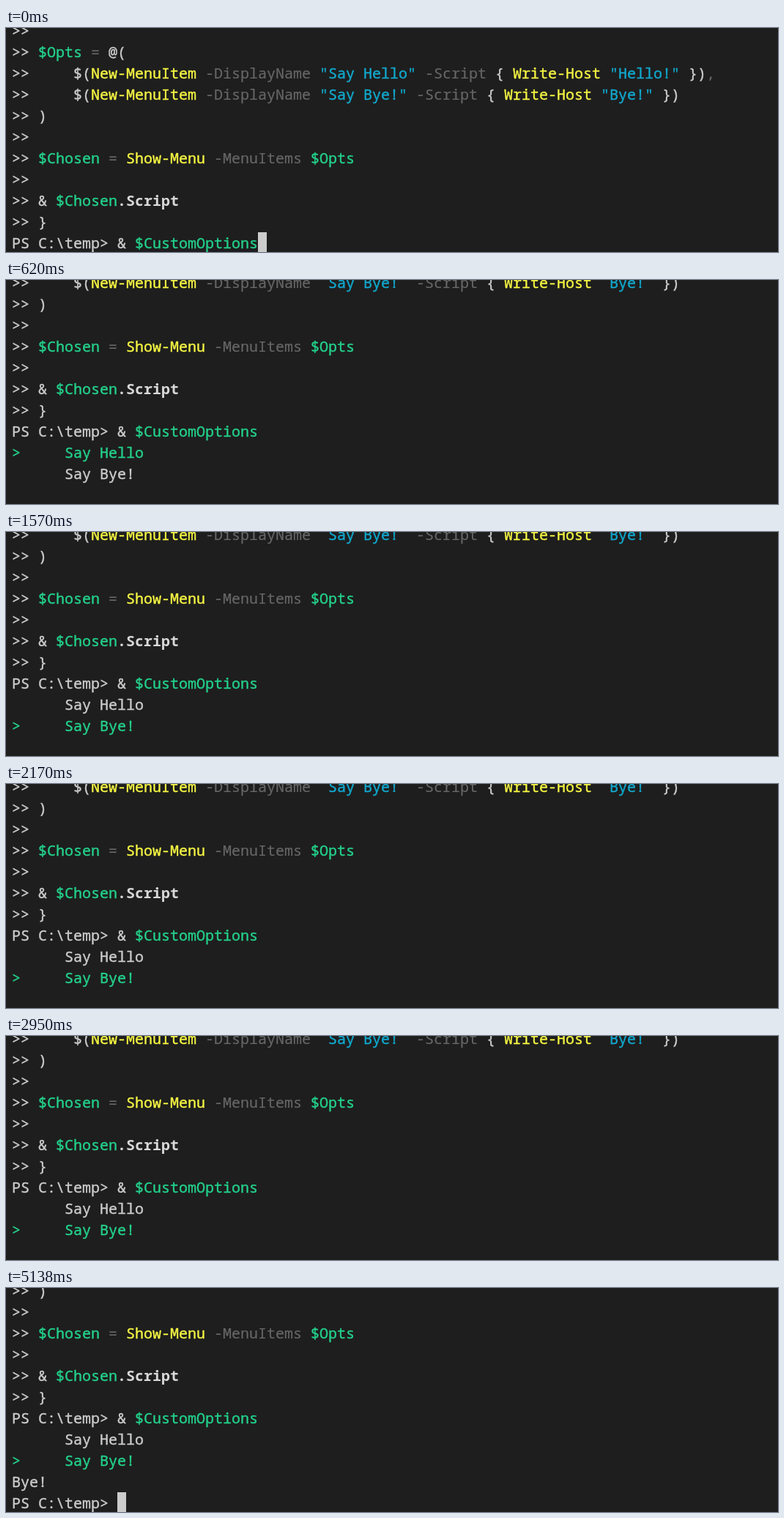
An HTML page that plays this animation: 1054x306 px, repeating every 6.23 s.

```html
<!DOCTYPE html>
<html lang="en">
<head>
<meta charset="utf-8">
<title>Terminal menu</title>
<style>
  html, body { margin: 0; width: 100%; height: 100%; overflow: hidden; background: #1e1e1e; }
  #stage { position: relative; width: 1054px; height: 306px; overflow: hidden; }
  #log {
    position: absolute; left: 8px; top: -11px; margin: 0;
    font: 20px/29px "Noto Sans Mono", "DejaVu Sans Mono", monospace;
    color: #ccc; white-space: pre;
    -webkit-text-stroke: 0.4px currentColor;
  }
  .var { color: #23d18b; }
  .cmd { color: #f5f543; }
  .str { color: #11a8cd; }
  .dim { color: #666; -webkit-text-stroke-width: 0.2px; }
  b { color: #d8d8d8; -webkit-text-stroke-width: 0; }
  #cursor { position: absolute; left: 344px; top: 279px; width: 12px; height: 27px; background: #ccc; }

  .timed, .timed .mark { animation: 6230ms step-end infinite; }
  #log { animation-name: scroll; }
  #cursor { animation-name: cursor; }
  .quote { animation-name: clipped; }
  .hello { animation-name: hello; }
  .hello .mark { animation-name: hello-mark; }
  .bye { animation-name: bye; }
  .bye .mark { animation-name: bye-mark; }
  .result { animation-name: result; }

  @keyframes scroll {
    0% { top: -11px; }
    8.988% { top: -40px; }
    9.951% { top: -98px; }
    56.179%, 100% { top: -127px; }
  }
  @keyframes cursor {
    0% { left: 344px; visibility: visible; }
    8.988% { left: 8px; visibility: visible; }
    9.951% { left: 8px; visibility: hidden; }
    56.179%, 100% { left: 152px; visibility: visible; }
  }
  /* quote marks fall above the top edge once their line is the first row */
  @keyframes clipped {
    0% { visibility: visible; }
    9.951%, 100% { visibility: hidden; }
  }
  @keyframes hello {
    0% { color: #23d18b; visibility: hidden; }
    9.951% { color: #23d18b; visibility: visible; }
    25.2% { color: #ccc; visibility: visible; }
    41.251% { color: #23d18b; visibility: visible; }
    47.351%, 100% { color: #ccc; visibility: visible; }
  }
  @keyframes hello-mark {
    0% { opacity: 1; }
    25.2% { opacity: 0; }
    41.251% { opacity: 1; }
    47.351%, 100% { opacity: 0; }
  }
  @keyframes bye {
    0% { color: #ccc; visibility: hidden; }
    9.951% { color: #ccc; visibility: visible; }
    25.2% { color: #23d18b; visibility: visible; }
    41.251% { color: #ccc; visibility: visible; }
    47.351%, 100% { color: #23d18b; visibility: visible; }
  }
  @keyframes bye-mark {
    0% { opacity: 0; }
    25.2% { opacity: 1; }
    41.251% { opacity: 0; }
    47.351%, 100% { opacity: 1; }
  }
  @keyframes result {
    0% { visibility: hidden; }
    56.179%, 100% { visibility: visible; }
  }
</style>
</head>
<body>
<div id="stage">
<pre id="log" class="timed">&gt;&gt;
&gt;&gt; <span class="var">$Opts</span> <span class="dim">=</span> @(
&gt;&gt;     $(<span class="cmd">New-MenuItem</span> <span class="dim">-DisplayName</span> <span class="str">"Say Hello"</span> <span class="dim">-Script</span> { <span class="cmd">Write-Host</span> <span class="str">"Hello!"</span> })<span class="dim">,</span>
&gt;&gt;     $(<span class="cmd">New-MenuItem</span> <span class="dim">-DisplayName</span> <span class="str"><span class="timed quote">"</span>Say Bye!<span class="timed quote">"</span></span> <span class="dim">-Script</span> { <span class="cmd">Write-Host</span> <span class="str"><span class="timed quote">"</span>Bye!<span class="timed quote">"</span></span> })
&gt;&gt; )
&gt;&gt;
&gt;&gt; <span class="var">$Chosen</span> <span class="dim">=</span> <span class="cmd">Show-Menu</span> <span class="dim">-MenuItems</span> <span class="var">$Opts</span>
&gt;&gt;
&gt;&gt; &amp; <span class="var">$Chosen</span><b>.Script</b>
&gt;&gt; }
PS C:\temp&gt; &amp; <span class="var">$CustomOptions</span>
<span class="timed hello"><span class="mark">&gt;</span>     Say Hello</span>
<span class="timed bye"><span class="mark">&gt;</span>     Say Bye!</span>
<span class="timed result">Bye!
PS C:\temp&gt;</span></pre>
<div id="cursor" class="timed"></div>
</div>
</body>
</html>
```
